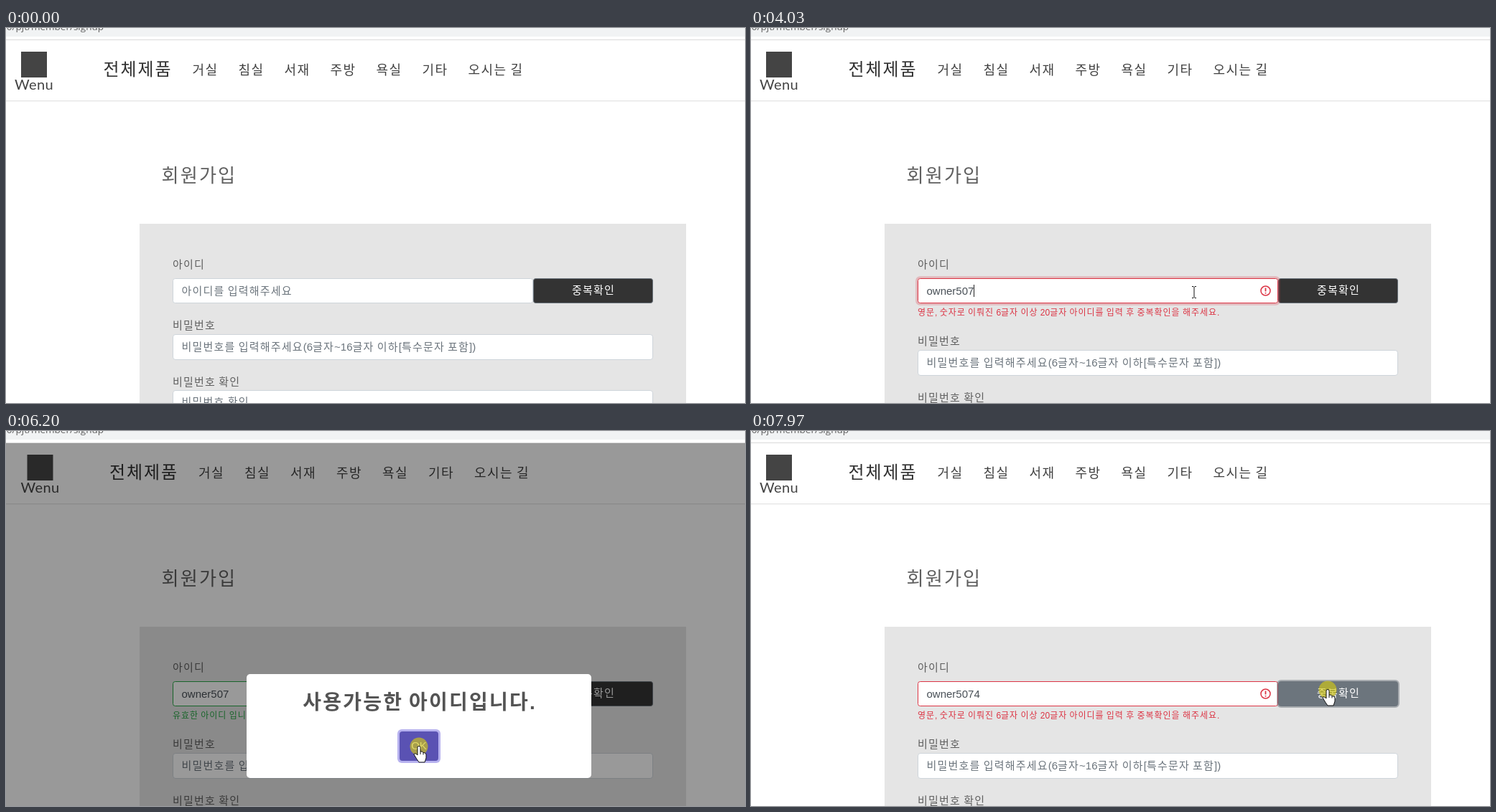
An HTML page that plays this animation: 1029x523 px, repeating every 8 s.

```html
<!DOCTYPE html>
<html lang="ko">
<head>
<meta charset="utf-8">
<title>회원가입</title>
<style>
html, body { margin: 0; width: 100%; height: 100%; overflow: hidden; background: #fff; }
svg { display: block; width: 100vw; height: 100vh; font: 15px "Liberation Sans", "Noto Sans CJK KR", "Noto Sans CJK", sans-serif; }
text { fill: #606060; white-space: pre; }
.ko { letter-spacing: .08em; }
.nav text { font-size: 18px; fill: #404040; }
.nav .all { font-size: 24px; fill: #303030; }
.nav .brand { font: 20px Lato, sans-serif; letter-spacing: .4px; fill: #444; }
.url { font: 13.5px "Open Sans", sans-serif; }
.title { font-size: 26.2px; }
.hint { fill: #6c757d; }
.typed text { fill: #495057; }
.small { font-size: 12px; }
.bad { fill: #dc3545; }
.good { fill: #28a745; }
.box { fill: #fff; stroke: #ced4da; }
.white { fill: #fff; }
.line { fill: none; }
.list { filter: drop-shadow(0 1px 2px rgba(0, 0, 0, .2)); }
.list path { fill: #fff; }
.list text { font: 12.5px "Noto Sans", sans-serif; fill: #222; }
.modal text { font-size: 28px; font-weight: 700; fill: #545454; text-anchor: middle; }
.modal .ok { font-size: 15px; font-weight: 400; fill: #fff; }
</style>
</head>
<body>
<svg viewBox="0 0 1029 523" preserveAspectRatio="none">
  <rect width="1029" height="12" fill="#f1f3f4"/>
  <text class="url" x="136" y="3" text-anchor="end">0/pjt/member/signup</text>
  <rect y="16" width="1029" height="1" fill="#dadada"/>
  <rect y="101" width="1029" height="1" fill="#e6e6e6"/>
  <rect y="102" width="1029" height="1" fill="#f6f6f6"/>

  <g id="nav" class="nav">
    <rect x="21" y="33" width="36" height="36" fill="#444"/>
    <text class="brand" x="39" y="86" text-anchor="middle">Wenu</text>
    <text class="all" x="135.500" y="66">전체제품</text>
  </g>

  <text class="title" x="216.500" y="215">회원가입</text>
  <rect x="186" y="273" width="761" height="250" fill="#e5e5e5"/>
  <text x="232" y="334.500">아이디</text>

  <g id="below">
    <text x="232" y="419.500">비밀번호</text>
    <rect class="box" x="232.500" y="427.500" width="668" height="35" rx="3.500"/>
    <text class="hint" x="244.500" y="450">비밀번호를 입력해주세요(6글자~16글자 이하[특수문자 포함])</text>
    <text x="232" y="498.500">비밀번호 확인</text>
    <rect class="box" x="232.500" y="505.500" width="668" height="35" rx="3.500"/>
    <text class="hint" x="244.500" y="527">비밀번호 확인</text>
  </g>

  <rect id="button" x="734.500" y="349.500" width="166" height="34" rx="3" fill="#333" stroke="#6c757d"/>
  <text class="white" x="788" y="371">중복확인</text>
  <rect id="field" class="box" x="232.500" y="349.500" width="501" height="34" rx="3"/>
  <rect id="fieldRing" class="line" x="230.700" y="347.700" width="504.600" height="37.600" rx="4.500" stroke-width="3"/>
  <rect id="buttonRing" class="line" x="733.500" y="348.500" width="168" height="36" rx="4.500" stroke="#6c757d" stroke-opacity=".5" stroke-width="3"/>

  <text id="hint" class="hint" x="244.500" y="372">아이디를 입력해주세요</text>
  <g id="typed" class="typed"></g>

  <g id="bad">
    <circle class="line" cx="716.500" cy="366.500" r="6.500" stroke="#dc3545" stroke-width="1.500"/>
    <path d="M716.500 362.500v5M716.500 369v1.600" stroke="#dc3545" stroke-width="1.800"/>
    <text class="small bad" x="232" y="401">영문, 숫자로 이뤄진 6글자 이상 20글자 아이디를 입력 후 중복확인을 해주세요.</text>
  </g>
  <g id="good">
    <path class="line" d="M709 367l5 5 9-11" stroke="#2b9348" stroke-width="3"/>
    <text class="small good" x="232" y="401">유효한 아이디 입니다.</text>
  </g>

  <g id="list" class="list">
    <path d="M334 394h10l8-8 8 8h38q4 0 4 4v132h-72v-132q0-4 4-4z"/>
    <text x="342" y="421">en</text>
    <text x="342" y="457">3@5.2</text>
    <text x="342" y="493">zxcv</text>
    <text x="342" y="528">40</text>
  </g>
  <g id="shortList" class="list">
    <path d="M334 394h10l8-8 8 8h51q4 0 4 4v72q0 4-4 4h-77q-4 0-4-4v-72q0-4 4-4z"/>
    <text x="342" y="421">owner50</text>
    <text x="342" y="457">owner507</text>
  </g>

  <rect id="shade" y="17" width="1029" height="506"/>
  <g transform="translate(575 411.500)">
    <g id="modal" class="modal">
      <rect class="white" x="-240" y="-72.500" width="480" height="145" rx="5"/>
      <text y="-24">사용가능한 아이디입니다.</text>
      <rect x="-30" y="4.500" width="60" height="47" rx="6" fill="#b7b2ef"/>
      <rect id="ok" x="-27" y="7.500" width="54" height="41" rx="4" fill="#7066e0"/>
      <text class="ok" y="32.500">OK</text>
    </g>
  </g>

  <g id="mouse">
    <circle id="click" r="12.500" fill="#d2c814" fill-opacity=".65"/>
    <path id="arrow" d="M0 0v16l3.800-3.500 2.500 5.700 2.500-1.100-2.500-5.500h5.200z" fill="#fff" stroke="#111"/>
    <path id="beam" class="line" d="M-3-7.500h2l1 1 1-1h2M0-6.500v14M-3 8.500h2l1-1 1 1h2" stroke="#111"/>
    <path id="hand" d="M-2 12V1.500Q-2-.5 0-.5T2 1.500V7q3-.5 4 1.500 3-.5 4 2.500v5q-1 3-2 6h-8q-3-4-7-11 1-3 5 1zM2 7v4M6 8.500v3" fill="#fff" stroke="#111" stroke-linejoin="round"/>
  </g>
</svg>
<script>
const LOOP = 8000;
const svgNS = 'http://www.w3.org/2000/svg';
const HOLD = 'steps(1, end)';
const find = id => document.getElementById(id);

function add(parent, tag, attrs, content = '') {
  const el = document.createElementNS(svgNS, tag);
  for (const name in attrs) el.setAttribute(name, attrs[name]);
  el.textContent = content;
  return parent.appendChild(el);
}

// stops: [time in ms, value]; the first and last value are held to the ends
function animate(el, prop, stops, easing = 'linear') {
  const all = [...stops, [LOOP, stops.at(-1)[1]]];
  if (all[0][0] > 0) all.unshift([0, all[0][1]]);
  el.animate(all.map(([t, value]) => ({ offset: t / LOOP, [prop]: value, easing })),
    { duration: LOOP, iterations: Infinity });
}

// visible only within the given [from, to] spans
function show(el, ...spans) {
  const stops = spans.flatMap(([from, to]) => to < LOOP ? [[from, 1], [to, 0]] : [[from, 1]]);
  if (stops[0][0] > 0) stops.unshift([0, 0]);
  animate(el, 'opacity', stops, HOLD);
}

['거실', '침실', '서재', '주방', '욕실', '기타', '오시는 길'].forEach((name, i) =>
  add(find('nav'), 'text', { x: 259.5 + 64 * i, y: 65 }, name));

for (const el of document.querySelectorAll('text'))
  el.innerHTML = el.textContent.replace(/[가-힣]+/g, '<tspan class="ko">$&</tspan>');

// Typing: each state has its text and a caret behind it
const id = 'owner5074';
const keyTimes = [0, 2550, 2680, 2880, 3010, 3140, 3290, 3500, 4030, 7220];
const caretSpans = {
  0: [[820, 1160], [1560, 2020], [2350, 2550]],
  7: [[3500, 3830]],
  8: [[4030, 4530], [6960, 7220]],
  9: [[7220, 7830]]
};
keyTimes.forEach((from, n) => {
  const to = keyTimes[n + 1] ?? LOOP;
  const text = add(find('typed'), 'text', { x: 244.5, y: 372 }, id.slice(0, n));
  const x = Math.floor(244.5 + (n ? text.getComputedTextLength() : 0));
  const caret = add(find('typed'), 'rect', { x, y: 358, width: 1, height: 17, fill: '#222' });
  show(text, [from, to]);
  show(caret, ...(caretSpans[n] ?? [[from, to]]));
});

// Form
const red = '#dc3545', green = '#28a745', grey = '#ced4da';
const blueGlow = 'rgba(0,123,255,.28)', redGlow = 'rgba(220,53,69,.25)';
const greenGlow = 'rgba(40,167,69,.25)', noGlow = 'rgba(0,0,0,0)';
animate(find('field'), 'stroke', [[800, grey], [950, '#80bdff'], [2550, '#80bdff'], [2680, red],
  [5080, red], [5230, green], [7220, green], [7350, red]]);
animate(find('fieldRing'), 'stroke', [[800, noGlow], [950, blueGlow], [2550, blueGlow],
  [2680, redGlow], [4860, redGlow], [4980, noGlow], [6940, noGlow], [7060, greenGlow],
  [7220, greenGlow], [7350, redGlow], [7830, redGlow], [7950, noGlow]]);
animate(find('button'), 'fill', [[4700, '#333'], [4800, '#6c757d'], [5090, '#6c757d'], [5230, '#333'],
  [7430, '#333'], [7500, '#6c757d']]);
show(find('buttonRing'), [4860, 5150], [7830, LOOP]);
show(find('hint'), [0, 2550]);
show(find('bad'), [2550, 5070], [7220, LOOP]);
show(find('good'), [5070, 7220]);
show(find('list'), [820, 2560]);
show(find('shortList'), [3350, 3560]);
animate(find('below'), 'transform', [[0, 'translate(0,0)'], [2550, 'translate(0,22px)']], HOLD);
animate(find('nav'), 'transform', [[0, 'translate(0,0)'], [5070, 'translate(8.5px,0)'], [6470, 'translate(0,0)']], HOLD);

// Dialog
animate(find('shade'), 'opacity', [[5020, 0], [5080, .23], [5140, .4], [6255, .4], [6355, 0]]);
animate(find('modal'), 'opacity', [[5069, 0], [5070, 1], [6255, 1], [6405, 0]]);
animate(find('modal'), 'transform', [[5085, 'scale(.7)'], [5220, 'scale(1.05)'], [5325, 'scale(.95)'],
  [5385, 'scale(1)'], [6255, 'scale(1)'], [6405, 'scale(.5)']]);
animate(find('ok'), 'fill', [[0, '#7066e0'], [5900, '#655cca'], [6200, '#5a52b3']], HOLD);

// Pointer
animate(find('mouse'), 'transform', [
  [70, 893, 521], [690, 617, 368], [4430, 617, 368], [4840, 758, 366], [5290, 758, 366],
  [6050, 575, 440], [6270, 575, 440], [6400, 566, 431], [6880, 600, 370], [7180, 600, 370],
  [7490, 803, 361]
].map(([t, x, y]) => [t, `translate(${x}px,${y}px)`]), 'ease-in-out');
show(find('arrow'), [70, 520], [5070, 5900], [6450, 6780]);
show(find('beam'), [520, 4710], [6780, 7390]);
show(find('hand'), [4710, 5070], [5900, 6450], [7390, LOOP]);
show(find('click'), [750, 930], [4860, 5010], [6200, 6320], [6900, 7030], [7830, LOOP]);
</script>
</body>
</html>
```
